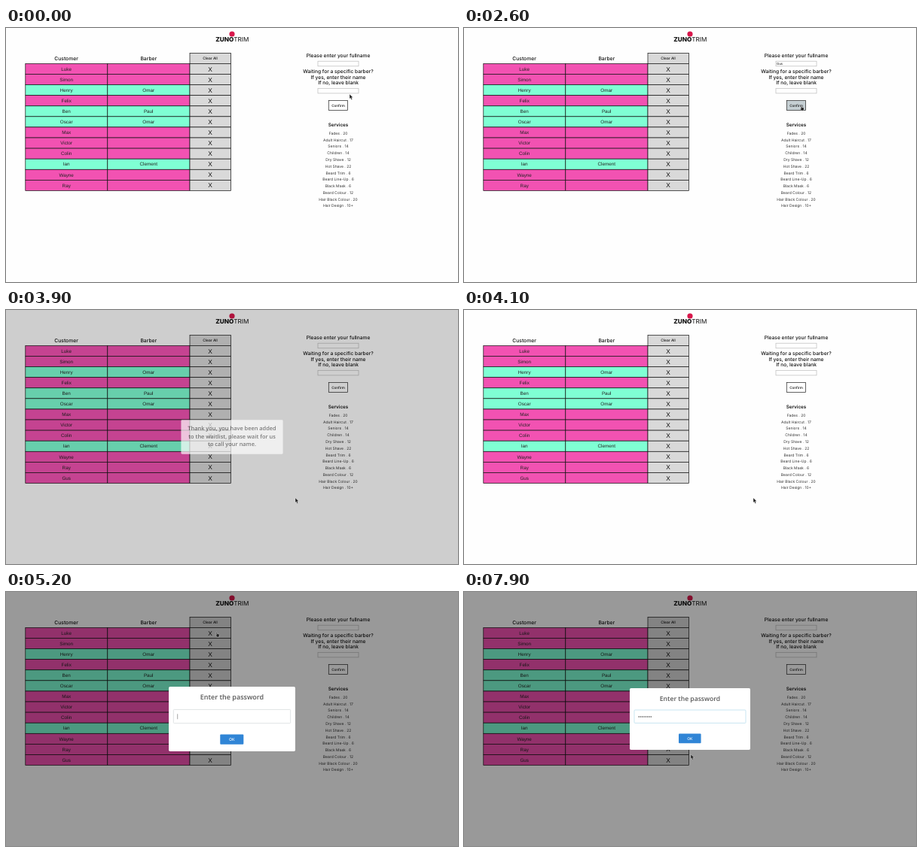
These frames come from a looping animation (600x338 px, 8 s). An HTML page:

```html
<!DOCTYPE html>
<html lang="en">
<head>
<meta charset="utf-8">
<title>Barber waitlist</title>
<style>
  html, body { margin: 0; width: 100%; height: 100%; overflow: hidden; background: #fefefe; }
  svg { display: block; width: 100%; height: 100%; }
  text { text-anchor: middle; text-rendering: geometricPrecision; font-family: Inter, sans-serif; }
  .cell { font-family: "Liberation Sans", Arial, sans-serif; }
  .title { font-family: "Open Sans", sans-serif; font-weight: 600; fill: #595959; }
</style>
</head>
<body>
<svg id="stage" viewBox="0 0 600 338"></svg>
<script>
const NS = "http://www.w3.org/2000/svg";
const LOOP = 8000;
const stage = document.getElementById("stage");

function el(parent, tag, attrs = {}, content) {
  const node = document.createElementNS(NS, tag);
  for (const key in attrs) node.setAttribute(key, attrs[key]);
  if (content !== undefined) node.textContent = content;
  return parent.appendChild(node);
}
const set = (node, attrs) => { for (const k in attrs) node.setAttribute(k, attrs[k]); };
const show = (node, on) => node.setAttribute("visibility", on ? "visible" : "hidden");
const group = (parent, attrs) => el(parent, "g", attrs);
const box = (parent, x, y, width, height, fill, stroke = "none", more = {}) =>
  el(parent, "rect", { x, y, width, height, fill, stroke, "stroke-width": 0.7, ...more });
const label = (parent, x, y, size, content, more = {}) =>
  el(parent, "text", { x, y, "font-size": size, fill: "#111", ...more }, content);

// Header
el(stage, "circle", { cx: 300, cy: 8, r: 3.6, fill: "#d8174b" });
const brand = label(stage, 300.3, 18.4, 8.2, "");
el(brand, "tspan", { "font-weight": 800 }, "ZUNO");
el(brand, "tspan", { "font-weight": 400 }, "TRIM");

// Waitlist table
const PINK = "#f252b2", GREEN = "#7fffd4", GRAY = "#d9d9d9";
const ROW = 14.09, TOP = 47.4;
const waitlist = [
  ["Luke"], ["Simon"], ["Henry", "Omar"], ["Felix"], ["Ben", "Paul"], ["Oscar", "Omar"],
  ["Max"], ["Victor"], ["Colin"], ["Ian", "Clement"], ["Wayne"], ["Ray"], ["Gus"]
];
label(stage, 80, 42.7, 6.75, "Customer", { "font-weight": 500 });
label(stage, 189.3, 42.7, 6.75, "Barber", { "font-weight": 500 });
box(stage, 244, 33.4, 54.4, 14, GRAY, "#111");
label(stage, 271, 42.3, 4.9, "Clear All", { "font-weight": 500 });

const rows = waitlist.map(([customer, barber], i) => {
  const row = group(stage), y = TOP + i * ROW, color = barber ? GREEN : PINK;
  box(row, 25.8, y, 109, ROW, color, "#111");
  box(row, 134.8, y, 109.2, ROW, color, "#111");
  box(row, 244, y, 54.4, ROW, GRAY, "#111");
  const name = { class: "cell", fill: "#222" };
  label(row, 80.2, y + 9.2, 6.3, customer, name);
  if (barber) label(row, 189.2, y + 9.2, 6.3, barber, name);
  label(row, 271, y + 10.1, 8.4, "X", { class: "cell" });
  return row;
});
const newRow = rows[rows.length - 1];

// Form
const FORM_X = 441;
const prompts = [
  [39.3, "Please enter your fullname"],
  [60.3, "Waiting for a specific barber?"],
  [67.7, "If yes, enter their name"],
  [75.2, "If no, leave blank"]
];
for (const [y, line] of prompts) label(stage, FORM_X, y, 6.65, line, { "font-weight": 500 });
const nameBox = box(stage, 414, 44.2, 54, 6.6, "#fff", "#bbb");
box(stage, 414, 80.3, 54, 6.6, "#fff", "#bbb");
const typed = label(stage, 415, 49.2, 4.4, "", { class: "cell", style: "text-anchor:start" });
const nameCaret = box(stage, 415, 45.4, 0.4, 4.4, "#111");
const confirm = box(stage, 428.3, 96.5, 25.3, 13, "#fff", "#222");
label(stage, FORM_X, 104.7, 4.6, "Confirm", { "font-weight": 500 });

label(stage, FORM_X, 131, 6.3, "Services", { "font-weight": 600 });
const services = [
  "Fades . 20", "Adult Haircut . 17", "Seniors . 14", "Children . 14", "Dry Shave . 12",
  "Hot Shave . 22", "Beard Trim . 6", "Beard Line-Up . 6", "Black Mask . 6",
  "Beard Colour . 12", "Hair Black Colour . 20", "Hair Design . 10+"
];
services.forEach((s, i) => label(stage, FORM_X, 141.9 + i * 8.77, 5, s, { fill: "#333" }));

// Dialogs, drawn around their centre
const shade = box(stage, 0, 0, 600, 338, "#000");
const thanks = group(stage);
box(thanks, -80, -27, 160, 54, "#fff", "none", { rx: 1.7 });
["Thank you, you have been added", "to the waitlist, please wait for us", "to call your name."]
  .forEach((line, i) => label(thanks, 0, -10.4 + i * 12.3, 8.75, line, { class: "title", fill: "#595959" }));

const login = group(stage);
box(login, -80, -41, 160, 82, "#fff", "none", { rx: 1.7 });
label(login, 0, -24.3, 8.6, "Enter the password", { class: "title", fill: "#595959" });
const field = box(login, -74, -12, 148, 17.4, "#fff", GRAY, { rx: 1 });
const DOT = 2.3, keys = [6000, 6200, 6300, 6500, 6600, 6800, 7000, 7200];
const dots = keys.map((_, i) =>
  el(login, "circle", { cx: -67.8 + i * DOT, cy: -3, r: 0.8, fill: "#444" }));
const passCaret = box(login, -69, -6.4, 0.5, 6.6, "#555");
box(login, -15, 19.6, 29.6, 12.6, "#3085d6", "none", { rx: 1 });
label(login, -0.2, 27.7, 5, "OK", { fill: "#fff", "font-weight": 500 });

// Pointer shapes
const pointer = group(stage);
const ink = { fill: "#222", stroke: "#fff", "stroke-width": 0.35, "stroke-linejoin": "round" };
const shapes = {
  arrow: el(pointer, "path", { ...ink, d: "M0 0V6.2L1.4 5L2.4 7.4L3.6 6.9L2.7 4.6L4.6 4.5Z" }),
  hand: el(pointer, "path", { ...ink,
    d: "M1 .6Q1.5-.2 2 .6L2.4 2.6L4.6 3.1Q5.3 3.3 5.2 4L4.7 7H2.2L.2 4.6Q.2 3.8 1.4 4.4Z" }),
  beam: el(pointer, "path", { d: "M0 0Q1 0 1 .7Q1 0 2 0M1 .7V5.6M0 6.3Q1 6.3 1 5.6Q1 6.3 2 6.3",
    fill: "none", stroke: "#222", "stroke-width": 0.5 })
};

// Timing
const clamp = (v, a = 0, b = 1) => Math.min(b, Math.max(a, v));
const mix = (a, b, k) => a + (b - a) * k;
const smooth = k => k * k * (3 - 2 * k);

// cubic-bezier(.25, .1, .25, 1)
function ease(x) {
  const curve = (a, b, s) => 3 * a * s * (1 - s) ** 2 + 3 * b * s * s * (1 - s) + s ** 3;
  let lo = 0, hi = 1;
  for (let i = 0; i < 20; i++) {
    const mid = (lo + hi) / 2;
    if (curve(0.25, 0.25, mid) < x) lo = mid; else hi = mid;
  }
  return curve(0.1, 1, lo);
}

function track(points, t, curve) {
  let i = 0;
  while (i < points.length - 2 && t >= points[i + 1][0]) i++;
  const [t0, ...a] = points[i], [t1, ...b] = points[i + 1];
  const k = curve(clamp((t - t0) / (t1 - t0)));
  return a.map((v, j) => mix(v, b[j], k));
}

const CONFIRMED = 2670, DISMISSED = 3870, ASKED = 5065;
const popIn = [[0, 0.7], [135, 1.05], [240, 0.95], [300, 1]];
const path = [
  [0, 456, 88], [80, 456, 88], [500, 434, 44.5], [2200, 434, 44.5], [2580, 446, 103],
  [2680, 446, 103], [2800, 385, 123], [3100, 390, 135], [3400, 393, 200], [3700, 384, 250],
  [4120, 384, 250], [4700, 278, 53], [7500, 278, 53], [7900, 301, 216]
];
const nameKeys = [800, 1100, 1500];

const count = (times, t) => times.filter(k => t >= k).length;
const blink = (times, t) => (t - Math.max(...times.filter(k => t >= k))) % 1000 < 500;

// Returns how dark the backdrop is, 0 to 1
function popup(node, t, open, close) {
  const on = t >= open && t < close + 150;
  show(node, on);
  if (!on) return 0;
  const out = ease(clamp((t - close) / 150));
  const scale = track(popIn, t - open, ease)[0] * (1 - 0.5 * out);
  set(node, { transform: `translate(300 169) scale(${scale})`, opacity: 1 - out });
  return ease(clamp((t - open) / 100)) * (1 - ease(clamp((t - close) / 100)));
}

function pointerShape(t) {
  if (t >= 420 && t < 2280) return "beam";
  const onConfirm = t >= 2500 && t < CONFIRMED;
  const onRemove = t >= 4650 && t < 6000;
  return onConfirm || onRemove ? "hand" : "arrow";
}

function draw(t) {
  const submitted = t >= CONFIRMED;
  const focused = t >= 500 && t < CONFIRMED;
  const letters = submitted ? 0 : count(nameKeys, t);
  typed.textContent = "Gus".slice(0, letters);
  set(nameBox, { stroke: focused && t < 2550 ? "#999" : "#bbb" });
  set(nameCaret, { x: 415 + (letters ? typed.getComputedTextLength() : 0) });
  show(nameCaret, focused && t < 2550 && blink([500, ...nameKeys], t));
  set(confirm, { fill: t >= 2500 && !submitted ? "#c5cfd3" : "#fff" });
  show(newRow, submitted);

  const dark = popup(thanks, t, CONFIRMED, DISMISSED) + popup(login, t, ASKED, LOOP);
  set(shade, { opacity: 0.4 * dark });

  const asked = t >= ASKED, entered = count(keys, t);
  dots.forEach((dot, i) => show(dot, asked && i < entered));
  set(passCaret, { x: -69 + entered * DOT });
  show(passCaret, asked && blink([ASKED, ...keys], t));
  const glow = clamp((t - ASKED - 100) / 300);
  set(field, { stroke: `rgb(${mix(217, 180, glow)},${mix(217, 219, glow)},${mix(217, 237, glow)})` });

  const [x, y] = track(path, t, smooth);
  set(pointer, { transform: `translate(${x} ${y})` });
  const hidden = (t >= 1500 && t < 2000) || (t >= 6000 && t < 7550);
  const shape = pointerShape(t);
  for (const name in shapes) show(shapes[name], !hidden && name === shape);
}

function tick() {
  draw(performance.now() % LOOP);
  requestAnimationFrame(tick);
}
tick();
</script>
</body>
</html>
```
